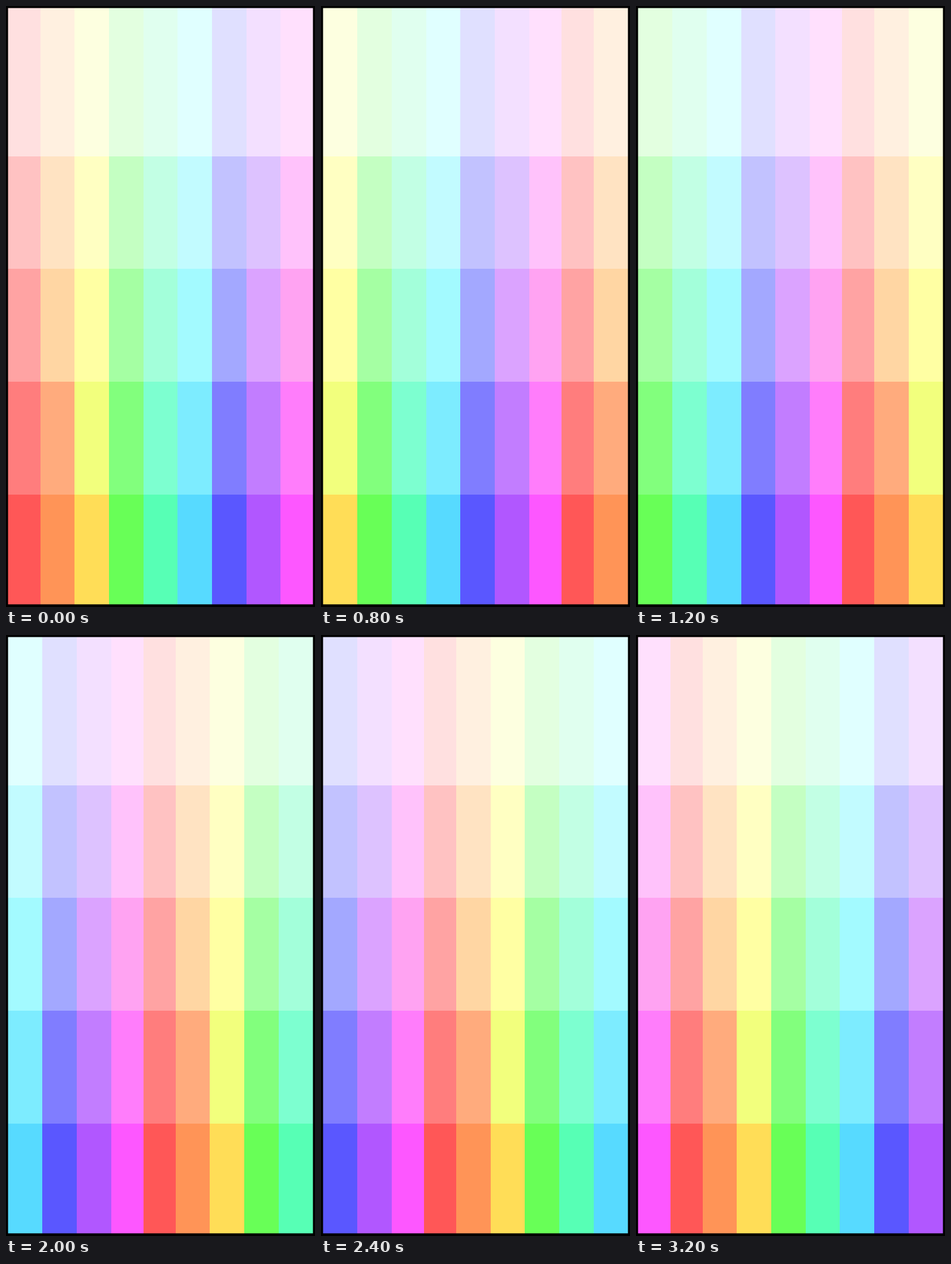
An HTML page with a canvas that plays this animation: 537 by 1043 pixels, repeating every 3600 ms.

```html
<!DOCTYPE html>
<html lang="en">
<head>
<meta charset="utf-8">
<title>Cycling colour columns</title>
<style>
  html, body { margin: 0; width: 100%; height: 100%; overflow: hidden; background: #000; }
  canvas { display: block; width: 537px; height: 1043px; }
</style>
</head>
<body>
<canvas id="stage" width="537" height="1043"></canvas>
<script>
const ctx = document.getElementById('stage').getContext('2d');
const STEP_MS = 400;
const LEFT = 3.6, RIGHT = 533.4;
const WIDE = 59.65, NARROW = 56;
const rowEdges = [3.6, 260.5, 456, 651.6, 847.5, 1038.4];

// Pale to saturated rows; columns run from red to pink.
const rows = [
  '#ffe0e0 #fff0e0 #fdffe0 #e3ffe0 #e0ffef #e0ffff #e0e0ff #f3e0ff #ffe0fd',
  '#ffc2c2 #ffe3c2 #ffffc2 #c4ffc2 #c2ffe4 #c2fbff #c2c2ff #ddc2ff #ffc2fb',
  '#ffa3a3 #ffd6a3 #ffffa3 #a5ffa3 #a3ffda #a3faff #a3a8ff #dba3ff #ffa3f2',
  '#ff7d7d #ffab7d #f2ff7d #82ff7d #7dffd0 #7decff #807dff #c27dff #ff7dfb',
  '#ff5757 #ff9457 #ffdd57 #68ff57 #57ffb5 #57daff #5a57ff #b157ff #fd57ff'
].map(row => row.split(' '));
const count = rows[0].length;

const columnWidth = i => (i === 0 || i === count - 1 ? NARROW : WIDE);

function draw(shift) {
  ctx.fillStyle = '#000';
  ctx.fillRect(0, 0, 537, 1043);
  let x = 3.75;
  for (let slot = 0; slot < count; slot++) {
    const column = (slot + shift) % count;
    const start = slot === 0 ? LEFT : Math.round(x);
    x += columnWidth(column);
    const end = slot === count - 1 ? RIGHT : Math.round(x);
    rows.forEach((row, r) => {
      const top = r ? Math.round(rowEdges[r]) : rowEdges[r];
      const bottom = r < rows.length - 1 ? Math.round(rowEdges[r + 1]) : rowEdges[r + 1];
      ctx.fillStyle = row[column];
      ctx.fillRect(start, top, end - start, bottom - top);
    });
  }
}

let shown = -1;
function tick() {
  const shift = Math.floor(performance.now() / STEP_MS) % count;
  if (shift !== shown) draw(shown = shift);
  requestAnimationFrame(tick);
}
tick();
</script>
</body>
</html>
```
